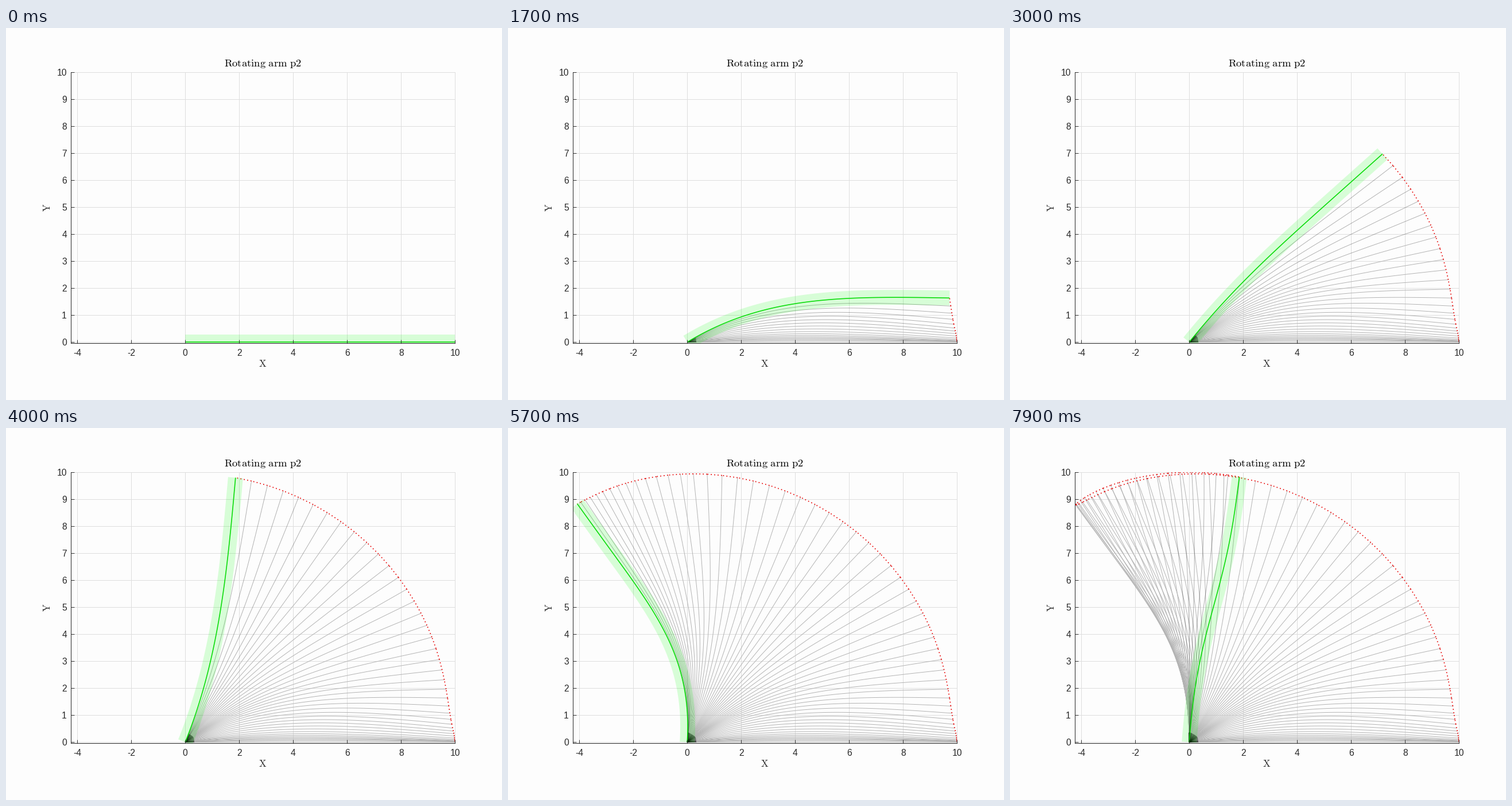
Write a matplotlib script that moves like this. It is 864 px wide and 648 px high and loops after 8000 ms.

```python
import numpy as np
import matplotlib.pyplot as plt
from matplotlib.animation import FuncAnimation
from matplotlib.collections import LineCollection

W, H = 864, 648
LEFT, RIGHT, TOP, BOTTOM = 113, 782.4, 77, 549
OX, OY, UNIT = 312.2, 547.2, 47.02
FRAMES = 80
INK = "#262626"

plt.rcParams.update({
    "font.family": "Liberation Sans",
    "mathtext.fontset": "cm",
    "axes.unicode_minus": False,
})


def smooth(t, *keys):
    """Cubic Hermite curve through a few (time, value) keys."""
    x, y = np.array(keys, float).T
    m = np.gradient(y, x)
    i = np.clip(np.searchsorted(x, t, side="right") - 1, 0, len(x) - 2)
    h = x[i + 1] - x[i]
    u = (t - x[i]) / h
    return ((1 + 2 * u) * (1 - u) ** 2 * y[i] + u * (1 - u) ** 2 * h * m[i]
            + u * u * (3 - 2 * u) * y[i + 1] + u * u * (u - 1) * h * m[i + 1])


# tip direction, then first and second bending mode, over time
t = np.arange(FRAMES)
angle = np.radians(smooth(t, (0, 0), (9, 1.3), (14, 4.9), (20, 15.7),
                          (28, 37.7), (35, 61.7), (43, 88.7), (51, 107),
                          (59.5, 115.6), (69, 103.3), (79, 79.3)))
bend = smooth(t, (0, 0), (7, .14), (15, .38), (26, .22), (37, -.12),
              (48, -.37), (59, -.48), (69, -.2), (79, .03))
wave = smooth(t, (0, 0), (40, 0), (58, -.08), (69, -.05), (79, .12))
xi = np.linspace(0, 1, 61)


def arm(angle, bend, wave):
    chord = 10 / (1 + .06 * bend ** 2 + .25 * bend ** 4)
    u = chord * xi
    v = (chord * bend * (2 * xi - 3 * xi ** 2 + xi ** 3) / 2
         + wave * np.sin(2 * np.pi * xi))
    c, s = np.cos(angle), np.sin(angle)
    return np.column_stack([u * c - v * s, u * s + v * c])


arms = [arm(*pose) for pose in zip(angle, bend, wave)]
tips = np.array([a[-1] for a in arms])
steps = [tips[k:k + 2] for k in range(FRAMES - 1)]

fig = plt.figure(figsize=(W / 72, H / 72), dpi=72, facecolor="#fdfdfd")
ax = fig.add_axes([LEFT / W, 1 - BOTTOM / H, (RIGHT - LEFT) / W,
                   (BOTTOM - TOP) / H], facecolor="none")
ax.set_xlim((LEFT - OX) / UNIT, (RIGHT - OX) / UNIT)
ax.set_ylim((OY - BOTTOM) / UNIT, (OY - TOP) / UNIT)
ax.set_axisbelow(False)
ax.set_xticks(range(-4, 11, 2))
ax.set_yticks(range(11))
ax.tick_params(direction="in", length=6, width=.9, color=INK,
               labelcolor=INK, labelsize=15.6)
ax.tick_params(axis="x", pad=10)
ax.tick_params(axis="y", pad=7)
for side in ("top", "right"):
    ax.spines[side].set_visible(False)
for side in ("left", "bottom"):
    ax.spines[side].set(color=INK, linewidth=1)

grid = dict(color="#dedede", lw=1, zorder=0, clip_on=False)
for x in range(-4, 11, 2):
    ax.plot([x, x], ax.get_ylim(), **grid)
for y in range(11):
    ax.plot(ax.get_xlim(), [y, y], **grid)


def label(x, y, text, size, **kw):
    fig.text(x / W, 1 - y / H, r"$\mathrm{%s}$" % text, fontsize=size,
             ha="center", **kw)


label(447.5, 67.3, r"Rotating\ arm\ p2", 18.6, va="baseline", color="black")
label(447.5, 590.5, "X", 16.8, va="baseline", color=INK)
label(72, 312.5, "Y", 16.8, va="center", rotation=90, color=INK)


def lines(zorder, **kw):
    return ax.add_collection(LineCollection([], zorder=zorder, **kw),
                             autolim=False)


old = lines(1, colors="#b2b2b2", linewidths=.95)
recent = lines(1.1, colors=(0, 0, 0, .31), linewidths=.95)
roots = lines(1.2, colors=(0, 0, 0, .25), linewidths=1)
trail = lines(1.3, colors="#e80000", linewidths=1.7,
              linestyles=[(0, (1, 2.5))], capstyle="butt")
glow, = ax.plot([], [], color=(0, 1, 0, .15), lw=26, zorder=1.4,
                solid_capstyle="butt", solid_joinstyle="round")
rod, = ax.plot([], [], color="#08dc08", lw=1.6, zorder=1.5,
               solid_capstyle="butt")


def draw(k):
    cut = max(0, k - 6)
    old.set_segments(arms[:cut])
    recent.set_segments(arms[cut:k])
    roots.set_segments([a[:3] for a in arms[:k]])
    trail.set_segments(steps[:k])
    glow.set_data(*arms[k].T)
    rod.set_data(*arms[k].T)
    return old, recent, roots, trail, glow, rod


anim = FuncAnimation(fig, draw, frames=FRAMES, interval=100, repeat=True,
                     repeat_delay=0, init_func=lambda: draw(0))
plt.show()
```
